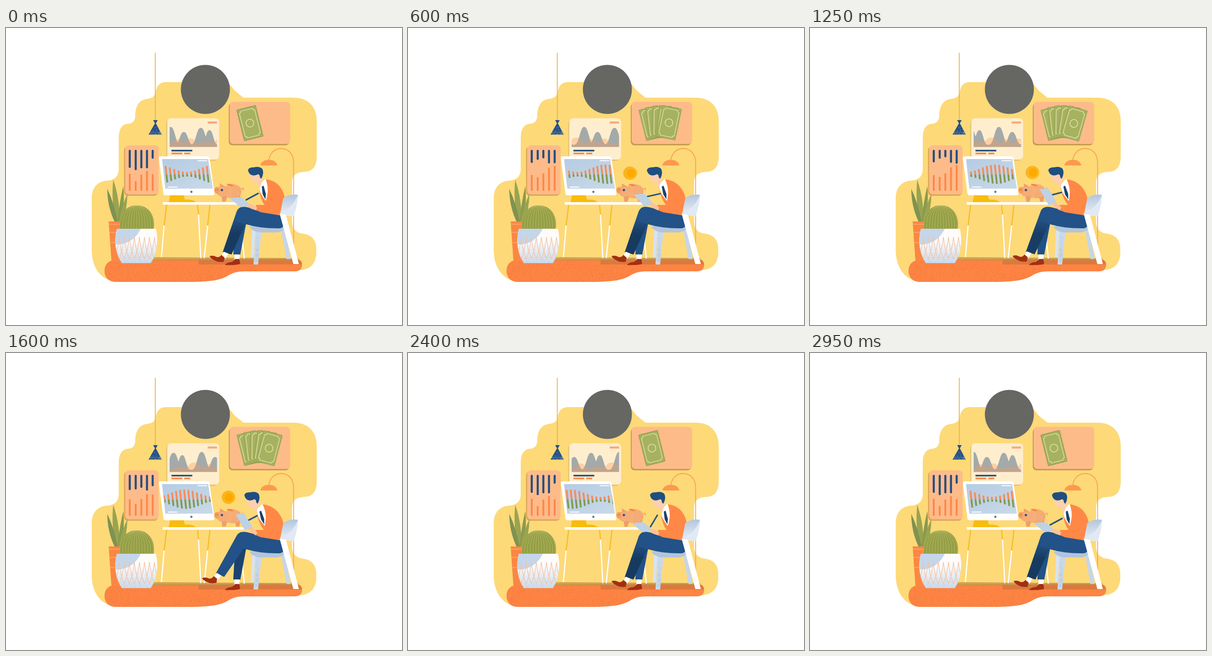
An HTML page that plays this animation: 864 px wide and 648 px high, repeating every 3 s.

```html
<!DOCTYPE html>
<html lang="en">
<head>
<meta charset="utf-8">
<title>Home office</title>
<style>
html, body { margin: 0; width: 100%; height: 100%; overflow: hidden; background: #fff; }
svg { display: block; width: 864px; height: 648px; }
</style>
</head>
<body>
<svg viewBox="0 0 864 648" xmlns="http://www.w3.org/2000/svg">
<defs>
  <linearGradient id="screenFill" x1="0" y1="0" x2="1" y2="1">
    <stop offset="0" stop-color="#b5cce3"/><stop offset="1" stop-color="#c9d9e8"/>
  </linearGradient>
  <linearGradient id="potFill" x1="0" y1="0" x2="0" y2="1">
    <stop offset=".35" stop-color="#fdfcfb"/><stop offset="1" stop-color="#ccdbec"/>
  </linearGradient>
  <linearGradient id="legShade" gradientUnits="userSpaceOnUse" x1="0" y1="415" x2="0" y2="450">
    <stop offset="0" stop-color="#173a60" stop-opacity="0"/><stop offset="1" stop-color="#173a60"/>
  </linearGradient>
  <linearGradient id="chairFill" x1="0" y1="0" x2="0" y2="1">
    <stop offset="0" stop-color="#b3c6dd"/><stop offset="1" stop-color="#edf2f8"/>
  </linearGradient>
  <clipPath id="floorClip"><path id="floorShape" d="M240 506L628 503C642 503 646 510 646 517C646 526 640 531 630 531H522C491 531 490 540 470 547C450 553 425 554 400 554H240C224 554 215 544 215 530C215 516 224 506 240 506Z"/></clipPath>
  <clipPath id="areaClip"><rect x="357" y="205" width="103.500" height="54.500"/></clipPath>
  <clipPath id="screenClip"><path d="M342 291H442L450 345H348Z"/></clipPath>
  <clipPath id="cactusClip"><path id="cactusShape" d="M249 440C245 412 258 387 285 387C313 387 327 412 322 440Z"/></clipPath>
  <clipPath id="potClip"><path id="potShape" d="M242 438H327C333 463 330 492 316 513H253C238 493 235 463 242 438Z"/></clipPath>
  <clipPath id="shadeClip"><path d="M321 201H331L327 208L340 232.500H311L325 208Z"/></clipPath>
  <clipPath id="nearClip"><path id="nearShape" d="M500 424C506 408 526 410 524 426L511 495L496 494Z"/></clipPath>
  <path id="farShape" d="M503 401C508 386 527 388 529 400L522 428L492 494L473 489Z"/>
  <clipPath id="pigClip"><ellipse cx="494" cy="356" rx="20" ry="15.500"/></clipPath>
  <g id="bill">
    <rect x="-21" y="-34.500" width="42" height="69" rx="1" fill="#a6b25f" stroke="#8c9a4c" stroke-width=".8"/>
    <path d="M-13 -30H13Q13 -26 17 -26V26Q13 26 13 30H-13Q-13 26 -17 26V-26Q-13 -26 -13 -30Z" fill="none" stroke="#ece8b9" stroke-width="1.200"/>
    <circle r="8.500" fill="none" stroke="#e3e2aa" stroke-width="1.600"/>
  </g>
</defs>

<path fill="#fdd978" d="M187 372C187 347 201 334 221 333C238 332 246 322 246 308V240C246 220 253 210 266 209C277 208 282 202 282 190C283 168 292 157 306 155C321 153 325 149 327 137C330 124 337 118 350 118H478C488 118 492 130 501 138L518 152H628C659 152 678 171 678 203V280C678 303 668 314 650 314C631 315 624 323 624 338V424C625 441 636 448 650 449C668 452 677 464 677 482V490C677 513 664 528 640 528H522L400 545L240 553C207 551 187 523 187 484Z"/>
<use href="#floorShape" fill="#fd8443"/>
<g clip-path="url(#floorClip)">
  <path id="floorDots" stroke="#e06a35" opacity=".5"/>
  <path d="M420 506H646V516H420Z" fill="#b36a3a" opacity=".45"/>
</g>
<path d="M285 503L330 500L640 502L628 507H285Z" fill="#b98d43" opacity=".7"/>

<path d="M627.500 475V293C627 273 615 263 600 263C584 263 575 275 573 290" fill="none" stroke="#fba04e" stroke-width="1.800"/>
<path d="M555 300C557 284 589 283 592 300Z" fill="#fc994f"/>
<path d="M325.700 54V202" stroke="#eab43a" stroke-width="1.800"/>
<g clip-path="url(#shadeClip)">
  <rect x="310" y="200" width="32" height="34" fill="#244f83"/>
  <path id="shadeDots" stroke="#9fb3c4"/>
</g>

<circle cx="435" cy="134" r="53.500" fill="#666763"/>

<rect x="257.500" y="259" width="74" height="107" rx="8" fill="#dda557"/>
<rect x="260" y="256" width="73" height="107" rx="8" fill="#fdbb8a"/>
<g id="gauges" stroke-width="4.500"></g>

<rect x="349.500" y="200" width="112" height="90" rx="8" fill="#e6c478"/>
<rect x="352" y="197" width="113" height="90" rx="8" fill="#feeecd"/>
<rect x="440" y="204" width="20.500" height="4.500" fill="#fba879"/>
<g clip-path="url(#areaClip)">
  <path id="greyArea" fill="#a3aaa9"/>
  <path id="peachArea" fill="#f5985c" opacity=".35"/>
</g>
<path d="M361 267.500H406.500" stroke="#234e80" stroke-width="3.500"/>
<path d="M361 273.700H384.500M389 273.700H402" stroke="#fc8847" stroke-width="3.500"/>

<rect x="486" y="164" width="132" height="92" rx="8" fill="#c79a4d"/>
<rect x="488" y="161" width="132" height="92" rx="8" fill="#fdbb8a"/>
<g id="bills"></g>

<g fill="none" stroke-width="2.600">
  <path d="M350.500 386L345 431M418 386L420 407M445 386L440 431" stroke="#f6be26"/>
  <path d="M345 431L339 500M420 407L425 502M440 431L432.500 502M513 440L520 503" stroke="#fff"/>
</g>
<path d="M358 365H388L390 374Q409 374 414 380H355Z" fill="#f9bc0c"/>
<path d="M337 280H439Q443 280 444 284L455 361Q455 365 451 365H348Q344 365 343.500 361L333.500 284Q333 280 337 280Z" fill="#fff"/>
<path d="M340.500 286H441L451.500 350.500H347.500Z" fill="url(#screenFill)"/>
<path d="M418 289.500H439M353 347H374" stroke="#fff" stroke-width="2"/>
<circle cx="404.500" cy="357.500" r="2.400" fill="#5e7890"/>
<g clip-path="url(#screenClip)" stroke-width="3.900" fill="none">
  <path id="upBars" stroke="#f78b57"/>
  <path id="downBars" stroke="#82994d"/>
</g>

<g id="coin">
  <ellipse id="coinEdge" rx="14.500" ry="14.500" fill="#f5b323"/>
  <circle cx="1" r="13.500" fill="#fab91b"/><circle cx="1" r="9.500" fill="#ffa800"/>
</g>
<path d="M341.500 380H522L526 385.500H342.500Z" fill="#fff"/>
<g>
  <path d="M470 364L472 379H479L482 370H500L502 379H509L512 362Z" fill="#eca06b"/>
  <path d="M513 352Q519 345 518 355" fill="none" stroke="#eda16d" stroke-width="1.800"/>
  <ellipse cx="494" cy="356" rx="20" ry="15.500" fill="#f7ae77"/>
  <g clip-path="url(#pigClip)"><path id="pigDots" stroke="#d8874f" opacity=".6"/></g>
  <ellipse cx="472" cy="356" rx="13" ry="12" fill="#f6ac75"/>
  <path d="M468 347L466 339L477 345Z" fill="#ee9e67"/>
  <path d="M481 341Q491 338 497 345Q487 346 481 341Z" fill="#f4864a"/>
  <ellipse cx="460" cy="354" rx="5.500" ry="7" fill="#f39c63"/>
  <path d="M458 352V354M461 352V354" stroke="#c8713e" stroke-width="1.400"/>
  <circle cx="471" cy="353.500" r="2.600" fill="#275887"/>
</g>

<g fill="#98a451">
  <path d="M240 425Q229 377 234 331Q250 378 247 425Z"/>
  <path d="M238 425Q221 390 221 351Q236 382 244 425Z" fill="#7f9250"/>
  <path d="M243 425Q248 376 256 345Q260 381 250 425Z" fill="#8b9a4c"/>
  <path d="M246 425Q251 390 265 362Q264 399 253 425Z"/>
</g>
<path d="M224 422H252L250 508H230Z" fill="#fa8744"/>
<path d="M224 428H250M226 446H250M228 468H245" stroke="#fdb06c" stroke-width="1.600"/>
<use href="#cactusShape" fill="#949f45"/>
<g clip-path="url(#cactusClip)"><path id="ribs" fill="none" stroke="#bcbb6b" stroke-width=".9"/></g>
<use href="#potShape" fill="url(#potFill)"/>
<g clip-path="url(#potClip)">
  <path d="M238 438H294C284 459 265 474 238 472Z" fill="#c5d6ea"/>
  <path id="potDots" stroke="#b2c5da" opacity=".6"/>
  <path id="zigzag" fill="none" stroke="#f5c1a2" stroke-width="1.300"/>
</g>

<path d="M600 440H609L621 504H612Z" fill="#c6d6e8"/>
<path d="M537 440H545L540 500H534Z" fill="#d8e3ef"/>
<path d="M545 440H558L550 516H540Z" fill="#c9d9eb"/>
<path id="chairDots" stroke="#9fb4cb" opacity=".65"/>
<path d="M531 433Q570 426 612 430Q610 442 592 446H552Q536 443 531 433Z" fill="#b1c5dc"/>

<use href="#nearShape" fill="#225287"/>
<use id="nearShade" href="#nearShape" fill="#173a60"/>
<g clip-path="url(#nearClip)"><path id="legDots" stroke="#173a60" opacity=".7"/></g>
<path d="M499 494H510L509 507H498Z" fill="#fff"/>
<path d="M478 516Q484 511 490 511Q496 510 500 504L509 504L511 514L507 516Q493 518 478 517Z" fill="#a32f13"/>
<g id="farLeg">
  <use href="#farShape" fill="#225287"/>
  <use id="farShade" href="#farShape" fill="url(#legShade)"/>
  <path d="M475 488L485 492L479 503L469 499Z" fill="#fff"/>
  <path id="farShoe" d="M444 498Q451 495 458 499Q465 502 470 495L477 501L475 510Q463 512 455 507Q447 503 444 498Z" fill="#a32f13"/>
</g>
<path d="M503 403C507 391 516 389 526 391L550 397L609 410Q612 434 598 437Q557 438 523 428L503 422Z" fill="#225287"/>

<g id="torso">
  <path d="M552 342L566 329L573 349L567 378L556 362Z" fill="#fff"/>
  <path d="M558 346L562 344L567 362L566 374L560 363Z" fill="#1d426b"/>
  <path d="M567 330Q598 334 607 365Q611 390 605 410L556 402L542 396L546 386L564 386Q556 376 552 354Q562 373 567 377Q575 354 567 330Z" fill="#ff8847"/>
</g>
<g>
  <path d="M605 371Q620 361 637 364Q635 388 627 411L598 407Z" fill="url(#chairFill)"/>
  <path d="M637 364Q636 390 627 411L597 403Q625 395 637 364Z" fill="#e0e9f4"/>
  <path d="M597 405L611 408L639 515H627Z" fill="#fff"/>
</g>
<path id="pen" stroke="#235082" stroke-width="3.200" stroke-linecap="round"/>
<path id="tablet" fill="#bed1e5"/>
<path id="hand" d="M526 388Q530 383 535 384L548 391L546 398L534 394Z" fill="#fdc19d"/>
<g id="head">
  <path d="M531 317L556 314L560 331L554 349Q549 343 549 337Q539 338 535 330Z" fill="#fecfb1"/>
  <path d="M528 310Q530 303 541 304Q552 301 559 307Q564 316 557 329L554 326Q554 320 550 319Q541 324 534 320Q529 316 528 310Z" fill="#1f4e80"/>
</g>
</svg>

<script>
const LOOP = 3000, STEP = 50, TAU = Math.PI * 2;
const el = id => document.getElementById(id);
const set = (id, name, value) => el(id).setAttribute(name, value);
const mix = (a, b, p) => a + (b - a) * p;
const clamp = p => Math.min(1, Math.max(0, p));
const ease = p => (1 - Math.cos(Math.PI * clamp(p))) / 2;
// Rises over a..b, holds, then falls over c..d.
const hold = (t, a, b, c, d) => ease((t - a) / (b - a)) - ease((t - c) / (d - c));

let seed = 7;
const random = () => (seed = seed * 16807 % 2147483647) / 2147483647;

function stipple(id, x, y, w, h, count, size = 1, lean = .6) {
  let d = '';
  for (let i = 0; i < count; i++) {
    d += `M${(x + random() * w).toFixed(1)} ${(y + Math.pow(random(), lean) * h).toFixed(1)}h${size}`;
  }
  set(id, 'd', d);
  set(id, 'stroke-width', size);
}

stipple('floorDots', 215, 504, 330, 50, 1300, 1.1, .8);
stipple('shadeDots', 311, 214, 30, 19, 90, .9, .4);
stipple('pigDots', 492, 344, 24, 28, 110, .8);
stipple('potDots', 242, 462, 84, 50, 420, .9, .4);
stipple('legDots', 496, 425, 28, 40, 130, 1, 1.3);
stipple('chairDots', 544, 448, 7, 62, 130, .9, .6);

let ribs = '';
for (let i = -6; i <= 6; i++) ribs += `M285 386Q${285 + i * 7} 398 ${285 + i * 6} 440`;
set('ribs', 'd', ribs);

let zigzag = '';
for (let i = 0; i < 9; i++) {
  const x = 236 + i * 11;
  zigzag += `M${x} 456Q${x + 3} 485 ${x + 11} 504M${x + 11} 456Q${x + 8} 485 ${x} 504`;
}
set('zigzag', 'd', zigzag);

const gauges = [
  { x: 270, blue: [304, 292], orange: [318, 321] },
  { x: 283, blue: [309, 284], orange: [334, 325] },
  { x: 295.3, blue: [305, 281], orange: [320, 317] },
  { x: 307.6, blue: [305, 293], orange: [312, 304] },
  { x: 320, blue: [284, 295], orange: [319, 299] }
];
function drawGauges(p) {
  el('gauges').innerHTML = gauges.map(({ x, blue, orange }) =>
    `<path d="M${x} 268V${mix(...blue, p) - 1}" stroke="#234e80" stroke-linecap="round"/>
     <path d="M${x} ${mix(...orange, p)}V355" stroke="#ff8746" stroke-width="4"/>`).join('');
}

function drawBills(p) {
  const angle = -14 + 30 * p;
  el('bills').innerHTML = [0, 1, 2, 3, 4].map(i =>
    `<use href="#bill" transform="translate(552.500 289) rotate(${Math.min(angle, -14 + 7.5 * i)}) translate(0 -84)"/>`).join('');
}

const WAVE = 127.5;
const greyPeaks = [[359, 39, 12], [388, 28, 11], [425, 37, 12], [444, 32, 10]];
const peachPeaks = [[403, 14, 11], [342, 16, 15], [375, 12, 12], [440, 7, 18]];
function areaPath(peaks, base, shift) {
  let d = 'M356 260';
  for (let x = 356; x <= 462; x++) {
    const heights = peaks.map(([at, h, width]) => {
      let gap = (x - at - shift) % WAVE;
      gap -= Math.round(gap / WAVE) * WAVE;
      return h * Math.exp(-(Math.abs(gap / width) ** 2.7));
    });
    d += `L${x} ${(259 - base - Math.max(...heights)).toFixed(1)}`;
  }
  return d + 'V260Z';
}

function drawScreen(phase) {
  const pitch = 9, count = 14;
  let up = '', down = '';
  for (let i = 0; i < count * 3; i++) {
    const x = 269 + (i - phase * count) * pitch;
    if (x < 335 || x > 460) continue;
    const half = 13 - 8 * Math.cos(TAU * i / count);
    up += `M${x - half * .11} ${319 - half}L${x} 319.500`;
    down += `M${x} 319.500L${x + half * .11} ${319 + half}`;
  }
  set('upBars', 'd', up);
  set('downBars', 'd', down);
}

const penKeys = [
  [0, 524, 375, 550, 361], [400, 520, 371, 551, 360], [850, 525, 363, 549, 363.5],
  [1600, 527, 366, 548, 355], [2000, 530, 379, 547, 356],
  [2400, 529, 379, 544, 354], [2950, 524, 375, 550, 361], [3000, 524, 375, 550, 361]
];
function penPath(t) {
  const i = penKeys.findIndex(key => key[0] > t);
  const a = penKeys[i - 1], b = penKeys[i];
  const p = ease((t - a[0]) / (b[0] - a[0]));
  const [, x1, y1, x2, y2] = a.map((v, k) => mix(v, b[k], p));
  return `M${x1} ${y1}L${x2} ${y2}`;
}

const tabletLow = [487, 371, 514, 369, 535, 388, 512, 391];
const tabletHigh = [501, 352, 519, 349, 538, 380, 521, 387];

function draw(t) {
  const phase = t / LOOP;
  drawGauges(hold(t, 0, 750, 1250, 1950));
  drawBills(hold(t, 0, 800, 1500, 2300));
  set('greyArea', 'd', areaPath(greyPeaks, 4, phase * WAVE));
  set('peachArea', 'd', areaPath(peachPeaks, 4, phase * WAVE));
  drawScreen(phase);

  const rise = hold(t, 100, 350, 2050, 2350);
  const bob = 2.5 * Math.sin(TAU * (t - 580) / 1150);
  set('coin', 'transform', `translate(485.5 ${mix(358, 316.5 + bob, rise)})`);
  set('coin', 'visibility', rise > 0.01 ? 'visible' : 'hidden');
  set('coinEdge', 'cx', -1.2 - bob * .6);

  const lean = hold(t, 0, 800, 1800, 2400);
  set('head', 'transform', `translate(${-8 * lean} 0)`);
  set('torso', 'transform', `translate(0 400) skewX(${5.5 * lean}) translate(0 -400)`);

  const lift = hold(t, 450, 800, 1650, 2250);
  set('tablet', 'd', 'M' + tabletLow.map((v, i) => mix(v, tabletHigh[i], lift)).join(' ') + 'Z');
  set('hand', 'transform', `rotate(${14 * lift} 546 394)`);
  set('pen', 'd', penPath(t));

  const kick = hold(t, 1150, 1600, 2050, 2400);
  const tap = hold(t, 1600, 1950, 2050, 2400);
  set('farLeg', 'transform', `rotate(${10 * kick} 515 400)`);
  set('farShoe', 'transform', `rotate(${-14 * kick + 16 * tap} 474 499)`);
  set('farShade', 'opacity', 1 - kick);
  set('nearShade', 'opacity', .6 * kick);
}

const start = performance.now();
function tick() {
  const elapsed = performance.now() - start;
  draw(Math.floor(elapsed / STEP) * STEP % LOOP);
  requestAnimationFrame(tick);
}
draw(0);
requestAnimationFrame(tick);
</script>
</body>
</html>
```
